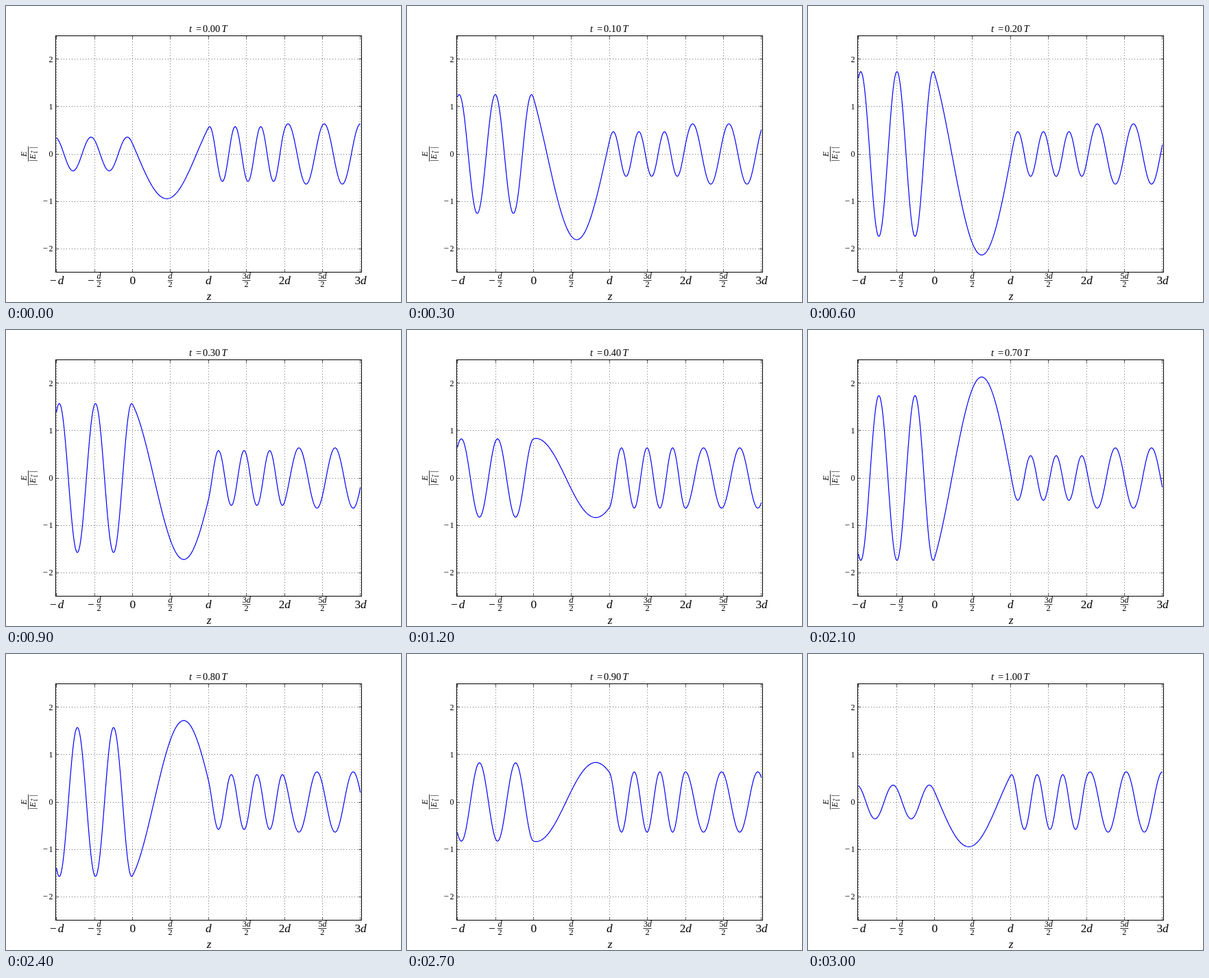
Recreate the animation shown at these times as an HTML page. Size 576 by 432 pixels, loop 3150 ms.

```html
<!DOCTYPE html>
<html lang="en">
<head>
<meta charset="utf-8">
<title>Wave in layered media</title>
<style>
  html, body { margin: 0; width: 100%; height: 100%; overflow: hidden; background: #fff; }
  svg { display: block; width: 576px; height: 432px; }
  text { font-family: "Liberation Serif", "Noto Serif", serif; fill: #000; }
  .mid { text-anchor: middle; }
  .end { text-anchor: end; }
  .it { font-style: italic; }
  .grid { stroke: #000; stroke-opacity: .55; stroke-dasharray: 1 3; }
  .tick { stroke: #000; stroke-opacity: .6; }
  .rule { stroke: #000; stroke-width: .8; }
  .frame { fill: none; stroke: #000; }
  .wave { fill: none; stroke: #00f; stroke-width: 1.2; stroke-linejoin: round; }
</style>
</head>
<body>
<svg viewBox="0 0 576 432">
  <g id="axes"></g>
  <path id="wave" class="wave"/>
  <rect class="frame" x="72.5" y="43.5" width="446" height="345"/>
  <g id="labels"></g>
  <g font-size="14.4">
    <text class="it" x="267" y="38">t</text>
    <text x="277" y="38">=</text>
    <text id="clock" x="287" y="38"></text>
    <text class="it" x="314.5" y="38">T</text>
  </g>
  <text class="mid it" x="296" y="429" font-size="17.3">z</text>
  <g transform="translate(32.5 216) rotate(-90)" font-size="12">
    <text class="mid it" x="0" y="-2.5">E</text>
    <line class="rule" x1="-11" x2="11" y1="0" y2="0"/>
    <text x="-10.5" y="10.5">|</text>
    <text class="it" x="-7.5" y="10.5">E</text>
    <text x="0.5" y="13" font-size="8.5">1</text>
    <text x="1" y="7" font-size="8.5">+</text>
    <text x="8" y="10.5">|</text>
  </g>
</svg>
<script>
const NS = 'http://www.w3.org/2000/svg';
const byId = id => document.getElementById(id);
const axes = byId('axes'), labels = byId('labels');
const toX = z => 295.2 + 110.8 * (z - 1);
const toY = e => 216 - 69.12 * e;
const snap = v => Math.floor(v) + 0.5;

function add(parent, tag, attrs, text = '') {
  const node = document.createElementNS(NS, tag);
  for (const key in attrs) node.setAttribute(key, attrs[key]);
  node.textContent = text;
  parent.append(node);
}
const line = (parent, cls, x1, y1, x2, y2) =>
  add(parent, 'line', { class: cls, x1, y1, x2, y2 });
const label = (cls, x, y, size, text) =>
  add(labels, 'text', { class: cls, x, y, 'font-size': size }, text);

for (let i = -2; i <= 6; i++) {
  const x = snap(toX(i / 2));
  line(axes, 'grid', x, 389, x, 43);
  line(axes, 'tick', x, 388, x, 384);
  line(axes, 'tick', x, 44, x, 48);
}
for (let e = -2; e <= 2; e++) {
  const y = snap(toY(e));
  line(axes, 'grid', 72, y, 518, y);
  line(axes, 'tick', 73, y, 77, y);
  line(axes, 'tick', 518, y, 514, y);
  label('end', 68.5, toY(e) + 4, 12, Math.abs(e));
  if (e < 0) label('', 53.5, toY(e) + 4, 13, '−');
}

// Horizontal axis labels: a multiple of d, whole or halved
const SIZE = 17.3, SMALL = 12.2;
function multiple(x, y, size, count) {
  if (count) label('end', x + 0.3, y, size, count);
  label(count ? 'it' : 'mid it', x + (count ? 0.3 : 0), y, size, 'd');
}
function half(x, count) {
  const reach = count ? 6 : 3.7;
  multiple(x, 398, SMALL, count);
  line(labels, 'rule', x - reach, 400.5, x + reach, 400.5);
  label('mid', x, 410, SMALL, '2');
}
label('', 64, 406, SIZE, '−');
multiple(80, 406, SIZE);
label('', 119, 406, SIZE, '−');
half(135.5);
label('mid', 184.7, 406, SIZE, '0');
half(239.6);
multiple(295.2, 406, SIZE);
half(350.5, '3');
multiple(406, 406, SIZE, '2');
half(461.3, '5');
multiple(516.8, 406, SIZE, '3');

// Wavenumbers of the four layers, each one unit thick, from z = -1 to 3
const TAU = 2 * Math.PI;
const K = [2.1, 0.6376, 2.97, 2.1].map(n => n * TAU);
const TRANSMITTED = 0.6365, PHASE = -0.63, STEPS = 110;

// Field and slope at a distance s from a point in a layer
const shift = ([e, slope], k, s) => [
  e * Math.cos(k * s) + slope / k * Math.sin(k * s),
  slope * Math.cos(k * s) - e * k * Math.sin(k * s)
];

function wavePath(time) {
  const psi = PHASE - TAU * time;
  const exit = [TRANSMITTED * Math.cos(psi), -TRANSMITTED * K[3] * Math.sin(psi)];
  const points = [];
  const plot = (z, e) => points.push(toX(z).toFixed(2) + ' ' + toY(e).toFixed(2));
  let state = shift(exit, K[3], 1);
  for (let layer = 3; layer >= 0; layer--) {
    for (let i = 0; i < STEPS; i++) {
      const s = i / STEPS;
      plot(layer - s, shift(state, K[layer], -s)[0]);
    }
    state = shift(state, K[layer], -1);
  }
  plot(-1, state[0]);
  return 'M' + points.join('L');
}

let shown = -1;
function draw() {
  const step = Math.floor(performance.now() % 3150 / 150);
  if (step !== shown) {
    shown = step;
    byId('clock').textContent = (step / 20).toFixed(2);
    byId('wave').setAttribute('d', wavePath(step / 20));
  }
  requestAnimationFrame(draw);
}
draw();
</script>
</body>
</html>
```
